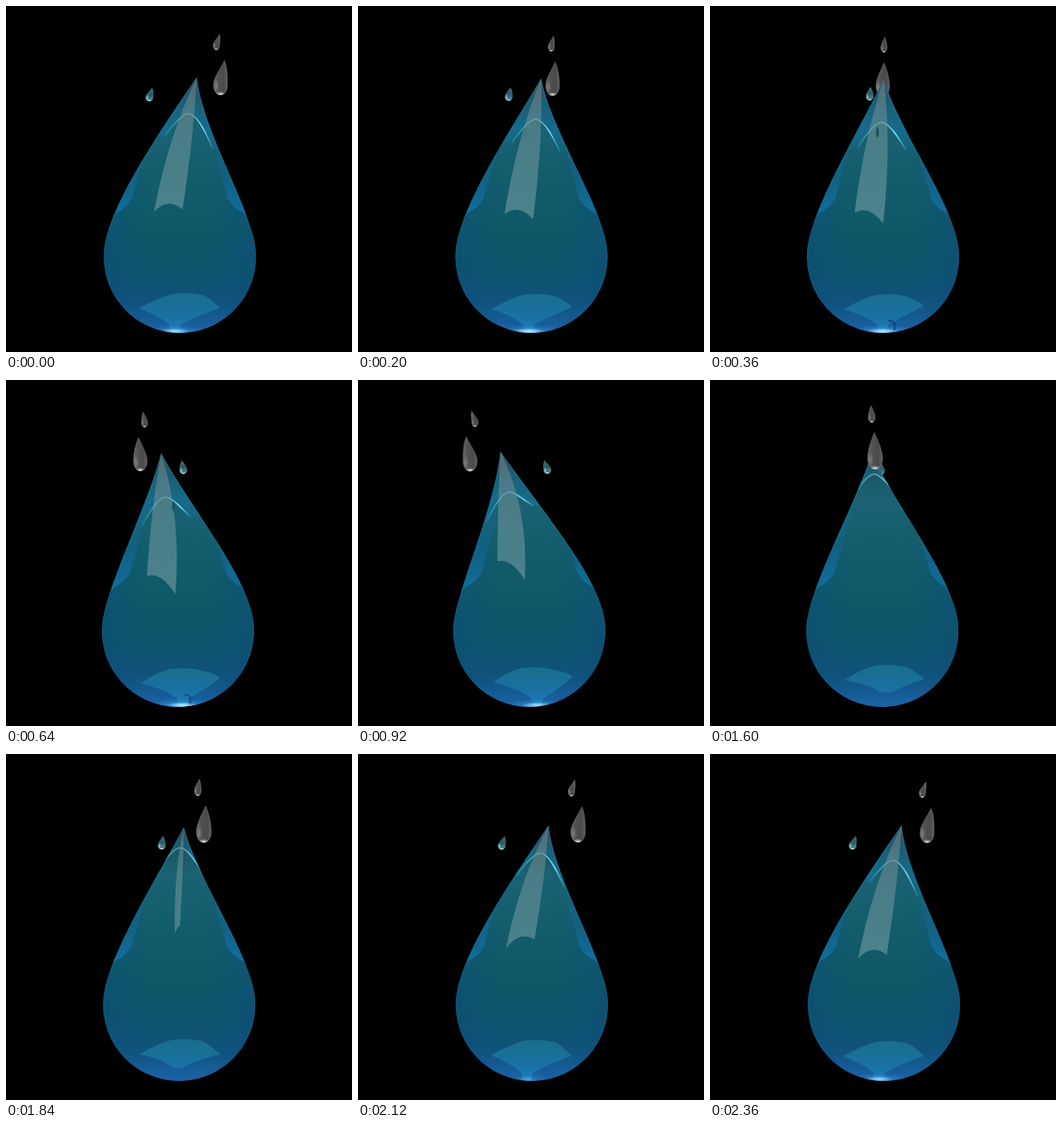
Animation of 400 by 400 pixels, one loop 2.4 s. Source, as an HTML page with a canvas:

```html
<!DOCTYPE html>
<html lang="en">
<head>
<meta charset="utf-8">
<title>Turning water drop</title>
<style>
html, body { margin: 0; width: 100%; height: 100%; overflow: hidden; background: #000; }
canvas { display: block; width: 400px; height: 400px; }
</style>
</head>
<body>
<canvas id="stage" width="400" height="400"></canvas>
<script>
const g = document.getElementById('stage').getContext('2d');
const LOOP = 2400, STEP = 40;

const wave = (angle, shift) => Math.cos(angle + shift * Math.PI / 180);

function ease(from, to, v) {
  const k = Math.min(1, Math.max(0, (v - from) / (to - from)));
  return k * k * (3 - 2 * k);
}

function ramp(x0, y0, x1, y1, ...stops) {
  const r = g.createLinearGradient(x0, y0, x1, y1);
  stops.forEach(([p, c]) => r.addColorStop(p, c));
  return r;
}

function glow(x, y, rx, ry, rgb, alpha) {
  g.save();
  g.translate(x, y);
  g.scale(rx, ry);
  const r = g.createRadialGradient(0, 0, 0, 0, 0, 1);
  r.addColorStop(0, `rgba(${rgb},${alpha})`);
  r.addColorStop(1, `rgba(${rgb},0)`);
  g.fillStyle = r;
  g.fillRect(-1, -1, 2, 2);
  g.restore();
}

// round base with nearly straight flanks and a bent tip
function bodyPath(cx, tx, ty, c) {
  const p = new Path2D();
  const join = Math.PI / 12;
  p.moveTo(tx, ty);
  p.bezierCurveTo(tx + 21 - 17 * c, ty + 54, cx + 71, 214, cx + 85, 267);
  p.arc(cx, 290, 88, -join, Math.PI + join);
  p.bezierCurveTo(cx - 71, 214, tx - 21 - 17 * c, ty + 54, tx, ty);
  return p;
}

function bead(x, top, h, w, lean, teal) {
  const r = w / 2, cy = top + h * .7, low = top + h * 1.1;
  const p = new Path2D();
  p.moveTo(x + lean, top);
  p.bezierCurveTo(x + lean + r * .45, top + h * .2, x + r, cy - h * .2, x + r, cy);
  p.bezierCurveTo(x + r, low, x - r, low, x - r, cy);
  p.bezierCurveTo(x - r, cy - h * .2, x + lean - r * .45, top + h * .2, x + lean, top);
  g.save();
  g.fillStyle = teal
    ? ramp(0, top, 0, top + h, [0, '#41686c'], [.5, '#275c66'], [1, '#5d9299'])
    : ramp(x - r, 0, x + r, 0, [0, '#686666'], [.3, '#535151'], [.7, '#4b4949'], [1, '#605e5e']);
  g.fill(p);
  g.strokeStyle = teal ? 'rgba(130,180,185,.4)' : 'rgba(150,145,145,.4)';
  g.lineWidth = .8;
  g.stroke(p);
  g.clip(p);
  glow(x, top + h - .5, r * .8, h * .09, '255,255,255', .9);
  glow(x - r * .6, cy + r * .2, r * .4, r, '235,245,245', teal ? .6 : .25);
  g.restore();
}

function sides(cx, c) {
  for (const s of [-1, 1]) {
    const x = v => cx + s * v;
    g.fillStyle = ramp(0, 150, 0, 258,
      [0, 'rgba(20,110,165,.1)'], [.45, 'rgba(18,110,165,.35)'], [.8, 'rgba(18,125,185,.6)'], [1, 'rgba(18,105,160,.1)']);
    g.beginPath();
    g.moveTo(x(34), 150 - s * c * 6);
    g.quadraticCurveTo(x(48), 195, x(55), 222);
    g.quadraticCurveTo(x(61), 233, x(73), 239);
    g.quadraticCurveTo(x(80), 246, x(85), 260);
    g.lineTo(x(105), 245);
    g.lineTo(x(90), 145);
    g.fill();
  }
}

// fan of light at the base, on a stem that shrinks when turned away
function floorLight(cx, c, d) {
  const l = cx - 44 - 3 * c, r = cx + 48 - 2 * c, top = 331 + 2 * d;
  const ly = 349 + 2 * d, ry = 346 + 3 * c;
  const away = ease(-.5, -1, d), stem = cx + 2 - 8 * c;
  const neck = 368 - 7 * away, foot = 378 - 17 * away;
  g.fillStyle = ramp(0, top, 0, 378,
    [0, 'rgba(30,122,150,.7)'], [.6, 'rgba(28,120,170,.75)'], [1, 'rgba(32,135,195,.7)']);
  g.beginPath();
  g.moveTo(l, ly);
  g.quadraticCurveTo(cx - 27, top + 6, cx - 8, top + 1);
  g.quadraticCurveTo(cx + 18, top - 1, cx + 30, top + 4);
  g.quadraticCurveTo(r - 6, ry - 6, r, ry);
  g.quadraticCurveTo(stem + 20, neck - 7, stem + 7, neck);
  g.lineTo(stem + 4, foot);
  g.lineTo(stem - 4, foot);
  g.lineTo(stem - 7, neck);
  g.quadraticCurveTo(stem - 17, neck - 9, l, ly);
  g.fill();
  const power = ease(-1, .8, d);
  glow(stem, 377, 20 + 22 * power, 8, '60,170,250', .7 * power);
  glow(stem, 376, 8 + 11 * power, 3.5, '200,245,255', power);
}

// pale facet that narrows to a sliver and closes
function sheen(a, tx, ty, c) {
  const open = ease(-.88, .05, wave(a, -45));
  if (!open) return;
  const bx = 198.5 + 6 * c, by = 223 + 29 * wave(a, -65);
  const ax = bx - 33 * open, ay = 217 + 24 * wave(a, -30);
  g.globalAlpha = Math.min(1, open * 15);
  g.fillStyle = ramp(0, 82, 0, 245,
    [0, 'rgba(115,130,132,.55)'], [.35, 'rgba(130,155,157,.46)'], [1, 'rgba(145,180,184,.46)']);
  g.beginPath();
  g.moveTo(tx, ty);
  g.quadraticCurveTo((tx + ax) / 2 - 5 - 4 * c, (ty + ay) / 2 - 8, ax, ay);
  g.quadraticCurveTo((ax + bx) / 2, (ay + by) / 2 - 16 * open, bx, by);
  g.quadraticCurveTo((tx + bx) / 2 + (12 - 8 * c) * open, (ty + by) / 2 - 8, tx, ty);
  g.fill();
  g.globalAlpha = 1;
}

function collar(x, y, tx, ty, c) {
  const ax = x - 27, ay = y + 30 - 5 * c;
  const bx = x + 28, by = y + 28 + 13 * c;
  const p = new Path2D();
  p.moveTo(ax, ay);
  p.bezierCurveTo(x - 14, y + 8, x - 6, y, x, y);
  p.bezierCurveTo(x + 6, y, x + 15, y + 9, bx, by);

  const cap = new Path2D(p);
  cap.lineTo(bx + 30, by);
  cap.lineTo(tx + 20, ty - 5);
  cap.lineTo(tx - 20, ty - 5);
  cap.lineTo(ax - 30, ay);
  g.fillStyle = ramp(0, ty, 0, Math.max(ay, by),
    [0, 'rgba(70,85,88,.5)'], [.3, 'rgba(30,100,135,.4)'], [.7, 'rgba(18,115,165,.5)'], [1, 'rgba(18,115,165,.15)']);
  g.fill(cap);

  g.lineWidth = 1.6;
  g.lineCap = 'round';
  g.strokeStyle = ramp(ax, 0, bx, 0,
    [0, 'rgba(60,190,215,.25)'], [.25, 'rgba(75,190,200,.7)'], [.5, 'rgba(130,190,190,.6)'],
    [.8, 'rgba(120,240,250,.95)'], [1, 'rgba(60,190,230,.25)']);
  g.stroke(p);
}

// faint mirrored beads
function echoes(alpha) {
  g.fillStyle = `rgba(12,62,82,${alpha})`;
  g.beginPath();
  g.ellipse(193.5, 146, 1.8, 6, 0, 0, 7);
  g.fill();
  g.strokeStyle = `rgba(10,60,115,${alpha})`;
  g.lineWidth = 2.5;
  g.beginPath();
  g.moveTo(207, 364);
  g.quadraticCurveTo(215, 363, 213, 374);
  g.stroke();
}

function drop(a, c, d) {
  const cx = 199.5 + 1.6 * c, tx = 192.5 + 30 * c, ty = 82 + 3 * (1 - c * c);
  const body = bodyPath(cx, tx, ty, c);
  g.save();
  g.fillStyle = ramp(0, 82, 0, 378,
    [0, 'rgba(50,85,95,.75)'], [.1, 'rgba(28,96,112,.92)'], [.2, '#1a6273'], [.4, '#125c6c'],
    [.6, '#0e5867'], [.75, '#0d556b'], [.87, '#0f527a'], [.95, '#165c98'], [1, '#1b64a6']);
  g.fill(body);
  g.clip(body);
  g.fillStyle = ramp(cx - 88, 0, cx + 88, 0,
    [0, 'rgba(14,75,120,.5)'], [.3, 'rgba(14,85,130,0)'], [.7, 'rgba(14,85,130,0)'], [1, 'rgba(14,75,120,.5)']);
  g.fillRect(100, 70, 200, 310);
  sides(cx, c);
  floorLight(cx, c, d);
  collar(193 + 19 * c, 122 + 14 * wave(a, -80), tx, ty, c);
  sheen(a, tx, ty, c);
  echoes(.7 * ease(.7, 1, d));
  g.strokeStyle = ramp(0, 90, 0, 270, [0, 'rgba(25,125,170,.4)'], [1, 'rgba(20,110,160,.1)']);
  g.lineWidth = 3;
  g.stroke(body);
  g.restore();
}

function draw(t) {
  const a = t / LOOP * 2 * Math.PI;
  const c = wave(a, 20), d = wave(a, -70), rise = wave(a, -95);
  const lean = 4.8 * c, near = 1 - .05 * d;

  const low = () => bead(192.5 - 28.5 * c, 94.3 + c - .5 * d, 15, 8.5, lean * .7, true);
  const high = () => {
    bead(192 + 64 * wave(a, 29), 63.3 + 3.2 * rise, 40.5 * near, 16.5 * near, lean, false);
    bead(191 + 58 * wave(a, 26), 33 + 4 * rise, 18.5 * near, 7.5 * near, lean * .8, false);
  };

  g.fillStyle = '#000';
  g.fillRect(0, 0, 400, 400);
  (d < 0 ? low : high)();
  drop(a, c, d);
  (d < 0 ? high : low)();
}

function frame(now) {
  draw(Math.floor(now % LOOP / STEP) * STEP);
  requestAnimationFrame(frame);
}
draw(0);
requestAnimationFrame(frame);
</script>
</body>
</html>
```
